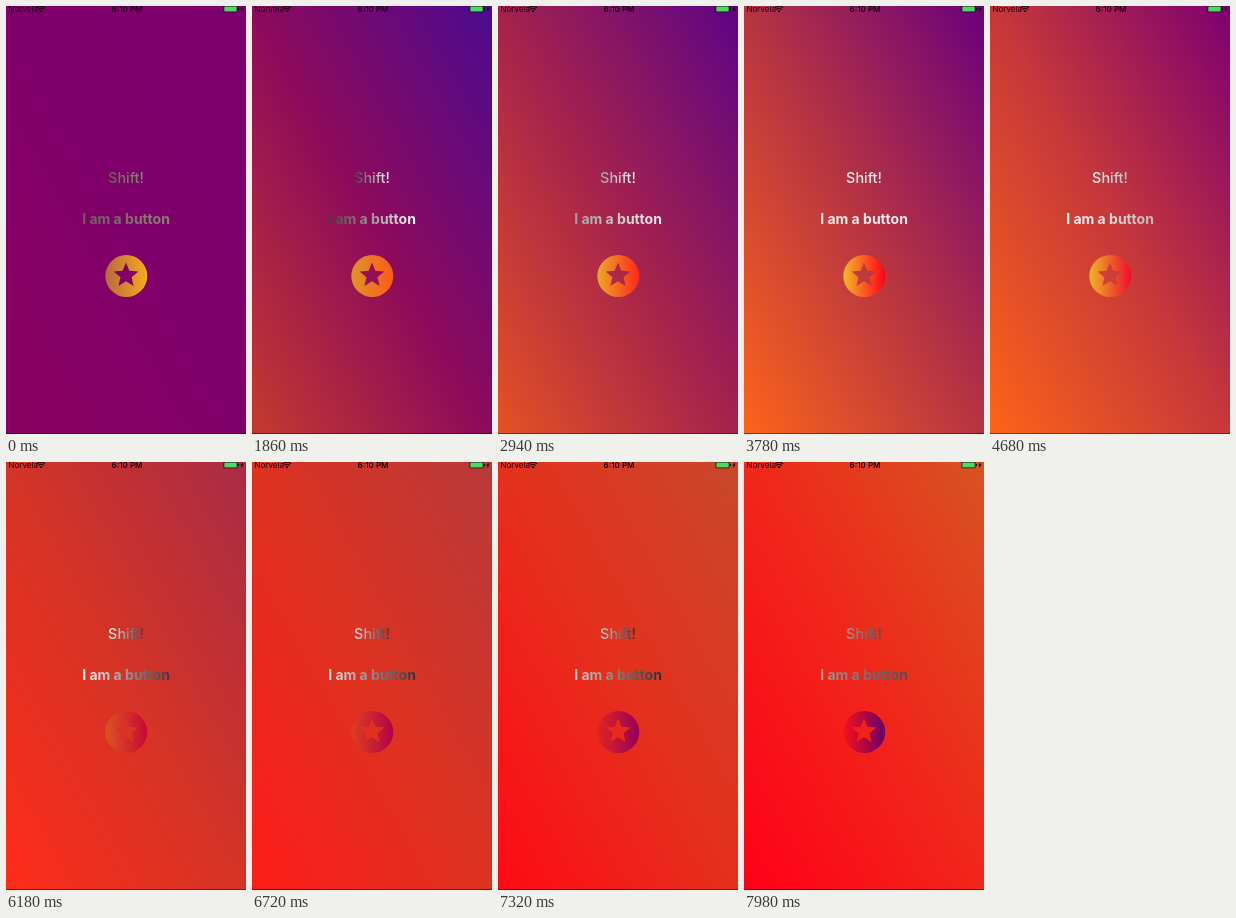
Animation of 240 by 428 pixels, one loop 8 s. Source, as an HTML page:

```html
<!DOCTYPE html>
<html lang="en">
<head>
<meta charset="utf-8">
<title>Shifting gradients</title>
<style>
@property --back-start { syntax: "<color>"; inherits: true; initial-value: #88005f; }
@property --back-mid { syntax: "<color>"; inherits: true; initial-value: #80006a; }
@property --back-end { syntax: "<color>"; inherits: true; initial-value: #7d006f; }
@property --text-start { syntax: "<color>"; inherits: true; initial-value: #69605a; }
@property --text-end { syntax: "<color>"; inherits: true; initial-value: #8a8470; }
@property --icon-start { syntax: "<color>"; inherits: true; initial-value: #b8683f; }
@property --icon-end { syntax: "<color>"; inherits: true; initial-value: #f5ab1e; }

html, body { margin: 0; width: 100%; height: 100%; overflow: hidden; }

.stage {
  display: block;
  width: 100%;
  height: 100%;
  background: linear-gradient(to top right, var(--back-start), var(--back-mid), var(--back-end));
  font-family: Inter, Roboto, sans-serif;
  animation: back 8s linear infinite, accents 8s linear infinite;
}

@keyframes back {
  0% {
    --back-start: #88005f; --back-mid: #80006a; --back-end: #7d006f;
    animation-timing-function: cubic-bezier(.5, 0, .8, .7);
  }
  23.25% { --back-start: #c43a2e; --back-mid: #8c0a5c; --back-end: #4c0a90; }
  47.25% { --back-start: #fc641a; --back-mid: #b63442; --back-end: #6a007c; }
  58.5% { --back-start: #fc6418; --back-mid: #c6383a; --back-end: #7c0070; }
  77.25% { --back-start: #fe2c1a; --back-mid: #d43426; --back-end: #a82c46; }
  91.5% { --back-start: #ff0a16; --back-mid: #e4301c; --back-end: #c8482c; }
  100% { --back-start: #ff0018; --back-mid: #f0261a; --back-end: #d65422; }
}

@keyframes accents {
  0% { --text-start: #69605a; --text-end: #8a8470; --icon-start: #b8683f; --icon-end: #f5ab1e; }
  23.25% { --text-start: #3c3c40; --text-end: #fafafa; --icon-start: #dc942c; --icon-end: #fc5a1a; }
  47.25% { --text-start: #ececec; --text-end: #eae6e6; --icon-start: #f4b82a; --icon-end: #ff0018; }
  58.5% { --text-start: #fafafa; --text-end: #c0b8b8; --icon-start: #f2b42a; --icon-end: #ee0c2c; }
  77.25% { --text-start: #f8f8f8; --text-end: #37393f; --icon-start: #dc5420; --icon-end: #c80836; }
  91.5% { --text-start: #d2d0ce; --text-end: #282c30; --icon-start: #e02424; --icon-end: #96005a; }
  100% { --text-start: #a09a92; --text-end: #4c4e58; --icon-start: #f8101a; --icon-end: #66006e; }
}

.text-start { stop-color: var(--text-start); }
.text-end { stop-color: var(--text-end); }
.icon-start { stop-color: var(--icon-start); }
.icon-end { stop-color: var(--icon-end); }
.label { fill: url(#text-fill); font-size: 14.4px; font-weight: 500; text-anchor: middle; }
.button { font-size: 14px; font-weight: 700; }
.status { fill: #180810; font-size: 8px; }
.clock { font-weight: 600; text-anchor: middle; }
</style>
</head>
<body>
<svg class="stage" viewBox="0 0 240 428" preserveAspectRatio="none">
  <defs>
    <linearGradient id="text-fill">
      <stop class="text-start"/><stop class="text-end" offset="1"/>
    </linearGradient>
    <linearGradient id="icon-fill">
      <stop class="icon-start"/><stop class="icon-end" offset="1"/>
    </linearGradient>
  </defs>

  <g class="status">
    <text x="2.5" y="6">Norvela</text>
    <path d="M35 6.6l-1.5-1.8a2.2 2.2 0 0 1 3 0z"/>
    <path d="M32.4 3.5a3.8 3.8 0 0 1 5.2 0M31 1.8a5.8 5.8 0 0 1 8 0" fill="none" stroke="#180810" stroke-width="1.1"/>
    <text class="clock" x="121" y="6">6:10 PM</text>
    <rect x="217.5" y="-.3" width="14" height="6.6" rx="1.2"/>
    <rect x="218.3" y=".5" width="12.4" height="5" rx=".6" fill="#4cd964"/>
    <path d="M232 2h1v2h-1zM236.8 0l-2.4 3.5h1.3l-.6 2.8 2.6-3.7h-1.4z"/>
  </g>

  <text class="label" x="120" y="177">Shift!</text>
  <text class="label button" x="120" y="218">I am a button</text>

  <path fill="url(#icon-fill)" fill-rule="evenodd" d="M99.3 270a21 21 0 1 1 42 0a21 21 0 1 1 -42 0z
    M120 256.5l3.4 8.3 9 .7-6.9 5.8 2.1 8.7-7.6-4.7-7.6 4.7 2.1-8.7-6.9-5.8 9-.7z"/>

  <path d="M0 427h240v1H0z" fill-opacity=".45"/>
</svg>
</body>
</html>
```
